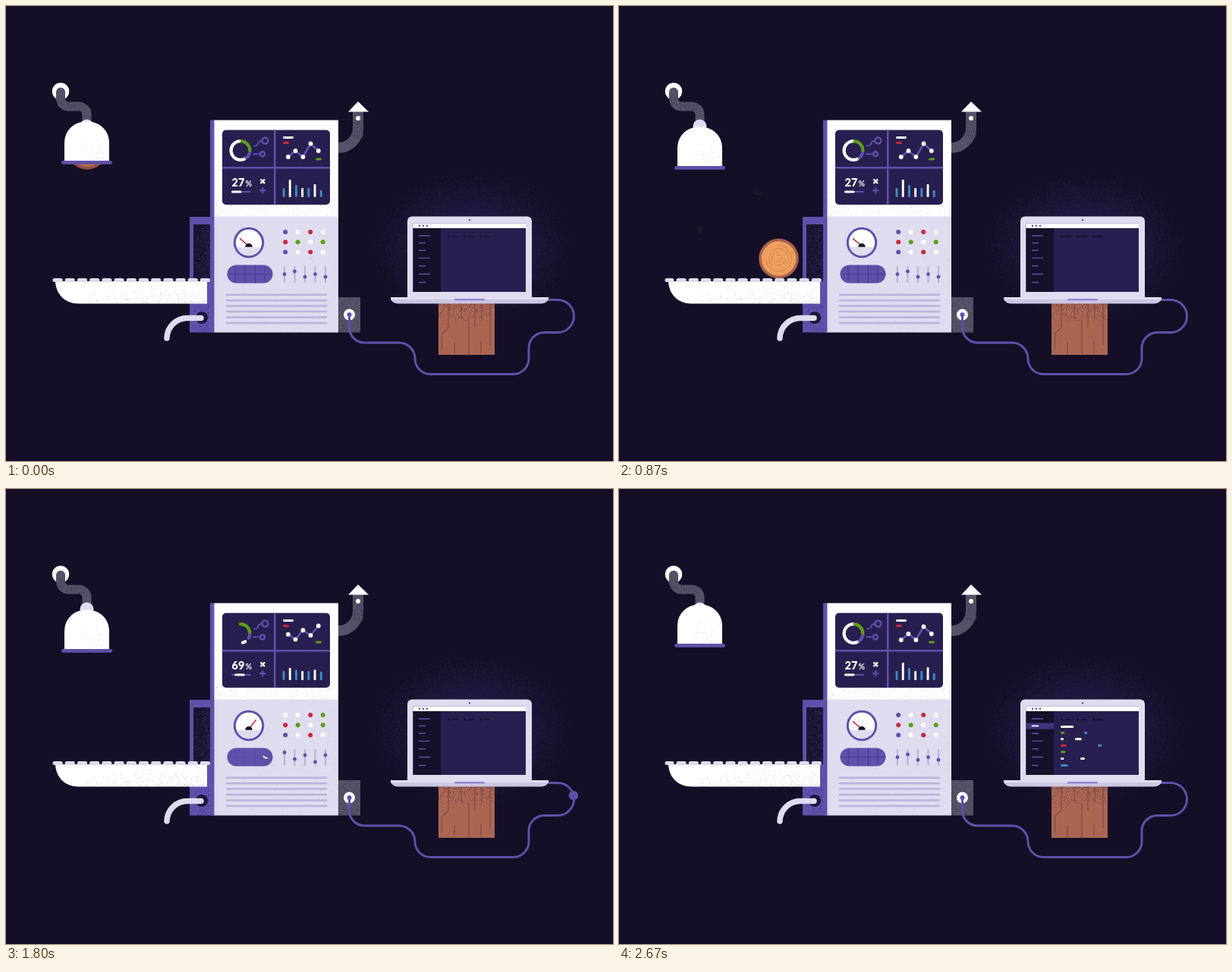
These frames come from a looping animation (800x600 px, 2700 ms). An HTML page with a canvas:

```html
<!DOCTYPE html>
<html lang="en">
<head>
<meta charset="utf-8">
<title>Data machine</title>
<style>
html, body { margin: 0; width: 100%; height: 100%; overflow: hidden; background: #140f27; }
canvas { display: block; width: 800px; height: 600px; }
</style>
</head>
<body>
<canvas id="stage" width="800" height="600"></canvas>
<script>
const LOOP = 2700;
const C = {
  bg: '#140f27', purple: '#5f50ab', lilac: '#dfdcef', shade: '#cfcae6', line: '#bab3dc',
  screen: '#281f50', dark: '#15112a', grey: '#565166', speck: '#464058', white: '#fff',
  red: '#c8293a', green: '#5c9f18', blue: '#3c8bc6',
  bark: '#a9604f', wood: '#ef9f5c', board: '#ab6652', trace: '#8a4f4a'
};
const HUE = { P: C.purple, W: C.white, R: C.red, G: C.green, B: C.blue };
const stage = document.getElementById('stage').getContext('2d');
let g = stage;

let seed = 7;
const rnd = () => (seed = (seed * 16807) % 2147483647) / 2147483647;
const clamp = v => Math.max(0, Math.min(1, v));
const mix = (a, b, k) => a + (b - a) * k;
const rad = deg => deg * Math.PI / 180;

// Smooth step from 0 to 1, and the same rise followed by a fall.
function ramp(t, a, b) {
  const u = clamp((t - a) / (b - a));
  return u * u * (3 - 2 * u);
}
const hump = (t, a, b, c, d) => ramp(t, a, b) - ramp(t, c, d);

function rect(x, y, w, h, fill, r = 0) {
  g.fillStyle = fill;
  g.beginPath();
  g.roundRect(x, y, w, h, r);
  g.fill();
}
function dot(x, y, r, fill) {
  g.fillStyle = fill;
  g.beginPath();
  g.arc(x, y, r, 0, 7);
  g.fill();
}
function shape(d, fill) {
  g.fillStyle = fill;
  g.fill(new Path2D(d));
}
function stroke(d, color, w, cap = 'round') {
  g.strokeStyle = color;
  g.lineWidth = w;
  g.lineCap = cap;
  g.lineJoin = 'round';
  g.stroke(typeof d === 'string' ? new Path2D(d) : d);
}
const line = (x1, y1, x2, y2, color, w, cap) => stroke(`M${x1} ${y1}L${x2} ${y2}`, color, w, cap);
function arc(x, y, r, from, to, color, w, cap = 'butt') {
  const p = new Path2D();
  p.arc(x, y, r, from, to);
  stroke(p, color, w, cap);
}

// Exponents above 1 crowd the specks left/top, below 1 right/bottom.
function grain(x, y, w, h, n, color, px = 1, py = 1) {
  g.fillStyle = color;
  for (let i = 0; i < n; i++) g.fillRect(Math.floor(x + w * rnd() ** px), Math.floor(y + h * rnd() ** py), 1, 1);
}

function layer(draw) {
  const c = document.createElement('canvas');
  c.width = 800;
  c.height = 600;
  g = c.getContext('2d');
  draw();
  g = stage;
  return c;
}

const glow = layer(() => {
  g.save();
  g.translate(614, 318);
  g.scale(1, .74);
  const grad = g.createRadialGradient(0, 0, 60, 0, 0, 130);
  grad.addColorStop(0, 'rgba(64,53,128,.8)');
  grad.addColorStop(1, 'rgba(64,53,128,0)');
  g.fillStyle = grad;
  g.fillRect(-140, -140, 280, 280);
  g.restore();
  g.fillStyle = 'rgba(72,60,142,.65)';
  for (let i = 0; i < 15000; i++) {
    const a = rnd() * 2 * Math.PI, r = Math.sqrt(rnd());
    if (rnd() < (1 - r) * 1.9) g.fillRect(Math.floor(614 + Math.cos(a) * r * 134), Math.floor(318 + Math.sin(a) * r * 103), 1, 1);
  }
});

const CABLE = 'M452.5 407V424A20 20 0 0 0 472.500 444H518A21 21 0 0 1 539 465A20.5 20.5 0 0 0 559.5 485.5H668.5A20.5 20.5 0 0 0 689 465V451A20.5 20.5 0 0 1 709.5 430.5H727A21.5 21.5 0 0 0 727 387.5H714';
const cable = document.createElementNS('http://www.w3.org/2000/svg', 'path');
cable.setAttribute('d', CABLE);
const cableLength = cable.getTotalLength();

const menuY = i => 303 + i * (9.3 + .16 * i);
const menuEnd = i => '1001010'[i] === '1' ? 558.5 : 552.5;
const tabX = i => 584 + 21 * i;

function tab(i, dotColor, lineColor) {
  dot(tabX(i), 304, 1.5, dotColor);
  line(tabX(i) + 4, 304, tabX(i) + 11, 304, lineColor, 1.7);
}

function laptop() {
  rect(529, 277.5, 164, 108, C.lilac, [6, 6, 0, 0]);
  rect(536.5, 286.5, 148.5, 90.5, C.screen);
  rect(536.5, 286.5, 148.5, 6.5, C.white);
  rect(536.5, 293, 36.5, 84, C.dark);
  for (let i = 0; i < 3; i++) {
    dot(545 + 5 * i, 289.7, 1.2, C.purple);
    tab(i, C.dark, C.dark);
  }
  dot(611, 282.3, 1.2, C.purple);
  shape('M507 384H715V387Q712 392.5 704 392.5H518Q510 392.5 507 387Z', '#cbc7e2');
  rect(507, 384, 208, 3, C.lilac);
  rect(591, 386, 40, 2.5, '#9188d2', 1);
  for (let i = 0; i < 7; i++) line(544.5, menuY(i), menuEnd(i), menuY(i), C.purple, 1.4);
}

const back = layer(() => {
  // Supply arm
  dot(72, 112.5, 11.2, C.white);
  stroke('M72 113.500V122A10.5 10.5 0 0 0 82.5 132.5H96A10.5 10.5 0 0 1 106.5 143V158', C.grey, 12);
  grain(67, 118, 11, 14, 40, C.speck);
  grain(80, 127, 26, 11, 80, C.speck);
  dot(106.5, 158.5, 9, C.lilac);
  // Exhaust
  stroke('M438 187A26 26 0 0 0 464 161V139', C.grey, 14, 'butt');
  grain(457, 140, 14, 34, 140, C.speck, 1, .7);
  shape('M451 139.5L464 126L478 139.5Z', C.white);
  dot(464, 148, 3, C.white);
  // Intake
  rect(242, 278, 33, 152.5, C.purple);
  rect(247, 288, 23, 75, '#1b1533');
  grain(247, 288, 22, 72, 200, '#30275f', .6, .8);
  grain(243, 393, 27, 37, 150, '#4a3e8f', .6);
  // Outlet block and circuit sheet
  rect(438, 384, 29, 46.5, C.grey);
  grain(438, 384, 29, 46, 220, C.speck, 1.8);
  rect(570, 390, 74, 70, C.board);
  stroke('M583 392V424L574.5 432V453M610 414V460M618 392V423M600 392V410M627 392V413M638 392V447M591 444V458M626 442V458', C.trace, 1.5);
  grain(570, 392, 74, 24, 380, '#7d4847', 1, 2.2);
  stroke(CABLE, C.purple, 3);
  dot(452.5, 407, 7.5, C.white);
  dot(452.5, 407, 3, C.purple);
  line(452.5, 407, 452.5, 415, C.purple, 3, 'butt');
  laptop();
});

const knobX = i => 367 + 13.5 * i;

const front = layer(() => {
  // Hose and tray
  dot(258, 411, 8, '#1d1638');
  stroke('M257 411.5H239A27 27 0 0 0 212 438', C.lilac, 7.5);
  shape('M65 363H265V392.5H96C77 392.5 66 380 65 363Z', C.white);
  grain(100, 364, 164, 28, 130, C.shade, .7, .35);
  // Body
  rect(269, 150.5, 6, 280, C.purple);
  rect(274.5, 150.5, 163.5, 127.5, C.white);
  rect(274.5, 277.5, 163.5, 153, C.lilac);
  grain(275, 151, 162, 126, 300, C.lilac, 1, .25);
  grain(275, 278, 162, 152, 200, C.shade, .5, .6);
  rect(285, 163.5, 142, 98.5, C.screen, 5);
  grain(286, 165, 140, 96, 600, '#231b48', .6, .6);
  rect(353, 163.5, 2.5, 98.5, C.purple);
  rect(285, 212, 142, 2.5, C.purple);
  // Dashboard fixtures
  arc(341.5, 177.5, 4, 0, 7, C.purple, 2.4);
  arc(338, 195.2, 3, 0, 7, C.purple, 2.4);
  stroke('M337 178C329 178 335 185 327 184.5M334 195.2H326', C.purple, 1.8);
  stroke('M335.5 228.5L341 234M341 228.5L335.5 234', C.white, 2.3, 'butt');
  stroke('M338.3 239V247.5M334 243.2H342.6', C.purple, 2, 'butt');
  line(298, 245, 322, 245, C.purple, 2);
  // Gauge, scope, vents
  dot(320, 312, 20.2, C.purple);
  dot(320, 312, 17.2, C.white);
  g.fillStyle = C.lilac;
  g.beginPath();
  g.arc(320, 312, 17.2, rad(20), rad(160));
  g.fill();
  rect(291.5, 341.5, 60, 24, C.purple, 12);
  for (let i = 0; i < 6; i++) line(291, 380.7 + i * 7.45, 422, 380.7 + i * 7.45, C.line, 2.5);
  for (let i = 0; i < 5; i++) line(knobX(i), 344, knobX(i), 364, C.line, 2.2);
});

// Launch time, start point, end point, end angle, spin.
const LEAVES = [
  [180, 97, 225, 49, 301, 28, 16],
  [250, 107, 328, 107, 295, 82, 60],
  [250, 125, 315, 182, 246, 3, 60],
  [1010, 235, 333, 178, 253, 78, 9],
  [1010, 250, 322, 180, 347, 32, 256]
];

// Flies fast, then slows and fades.
function leaf(t, [t0, x0, y0, x1, y1, angle, spin]) {
  const u = (t - t0) / 650;
  if (u < 0 || u > 1) return;
  const p = 1 - (1 - u) ** 5;
  g.save();
  g.globalAlpha = clamp(1.2 * (1 - u));
  g.translate(mix(x0, x1, p), mix(y0, y1, p));
  g.rotate(rad(angle - spin * (1 - p)));
  shape('M-7.5 0Q-1 -8 7.5 1Q0 7 -7.5 0Z', C.green);
  shape('M-7.5 0L7.5 1Q0 7 -7.5 0Z', '#3f7420');
  g.restore();
}

function log(t) {
  if (t > 1100 && t < 2680) return;
  const x = 107 + 195 * clamp((t - 300) / 790) ** 1.95;
  const q = (t > 2600 ? t - LOOP : t) / 240;
  const y = Math.min(333, 189 + 66 * q + 70 * q * Math.abs(q));
  dot(x, y, 26.3, C.bark);
  dot(x, y, 22.8, C.wood);
  const turn = (x - 107) / 26;
  for (let i = 0; i < 4; i++) arc(x, y, 4.5 + 4.2 * i, turn + 2.3 * i, turn + 2.3 * i + 4.6, '#c98456', .9);
  dot(x, y, 26.3, `rgba(130,60,55,${clamp((240 - y) / 50) * .5})`);
}

function bell(t) {
  const down = ramp(t, 0, 150) - ramp(t, 2380, 2600);
  g.save();
  g.translate(0, 7 * down - 7);
  shape('M77 212V188C77 149.5 136 149.5 136 188V212Z', C.white);
  grain(100, 178, 35, 33, 45, C.lilac, .5, .6);
  rect(73, 211, 67, 4.8, C.purple, 2.4);
  g.restore();
}

const PITCH = 16.2;
function belt(t) {
  const shift = (.9 + t / LOOP * 12 * PITCH) % PITCH;
  for (let x = 60.5 + shift - PITCH; x < 268; x += PITCH) {
    const a = Math.max(60.5, x), w = Math.min(269.5, x + 13.2) - a;
    if (w > 2) rect(a, 359, w, 5, C.lilac, Math.min(2.5, w / 2));
  }
}

function donut(t) {
  [[0, 97, C.green], [97, 150, C.purple], [150, 360, C.white]].forEach(([a, b, color], i) => {
    const left = 1 - hump(t, 1060 - 50 * i, 1300 - 70 * i, 1600 + 75 * i, 1850 + 100 * i);
    if (left > .005) arc(309, 190.5, 12.4, rad(a - 90), rad(mix(a, b, left) - 90), color, 4.2, left < 1 ? 'round' : 'butt');
  });
}

function chart(t) {
  const k = hump(t, 1020, 1390, 1700, 2250);
  const pts = [[199, 191], [191, 199], [199, 185], [181.5, 194], [191, 179.5]]
    .map(([a, b], i) => [371.8 + i * 9.6 + i * i * .1, mix(a, b, k)]);
  stroke('M' + pts.join('L'), C.purple, 2.6);
  for (const [x, y] of pts) dot(x, y, 2.9, C.white);
}

function legend(t) {
  [[366.5, 173.5, 11, C.white], [366.5, 180.5, 5, C.red], [409.5, 202, 5, C.green]].forEach(([x, y, w, color], i) => {
    g.globalAlpha = 1 - hump(t, 980 + 45 * i, 1120 + 60 * i, 1380 + 50 * i, 1640 + 50 * i);
    line(x, y, x + w, y, color, 2.8);
  });
  g.globalAlpha = 1;
}

// Bars drop away, return at an even height, then spread again.
function bars(t) {
  [12, 23, 16, 12, 12, 17, 9].forEach((tall, i) => {
    const even = mix(12, tall, .2), low = tall > 16 ? 5 : 0;
    const full = mix(tall, even, hump(t, 970, 1120, 1700, 2050));
    const h = mix(full, low, hump(t, 970, 1120, 1220 + 20 * i, 1520));
    if (h > .3) rect(364.6 + i * 8.2, 252 - h, 2.9, h, i % 2 ? C.white : C.blue, 1);
  });
}

function counter(t) {
  const k = hump(t, 980, 1180, 1640, 2000);
  g.fillStyle = C.white;
  g.font = '900 14.5px Lato, sans-serif';
  g.fillText(Math.round(mix(27, 99, k)), 297.5, 237.7);
  g.font = '700 10.5px Lato, sans-serif';
  g.fillText('%', 315.5, 237.7);
  line(298.5 + 7.5 * k, 245, 309 + 7.5 * k, 245, C.white, 3);
}

function lights(t) {
  const state = t < 1040 || t > 1950 ? 'PWRWRGWGPWRW' : t < 1330 ? 'WWRGRGWPWPRR' : 'WWRGRGWGPWRW';
  [...state].forEach((c, i) => dot(368.2 + i % 4 * 16.5, 298 + Math.floor(i / 4) * 13.2, 3, HUE[c]));
}

function gauge(t) {
  const a = rad(mix(-50, 48, hump(t, 980, 1250, 1700, 2220)));
  line(320, 316.5, 320 + Math.sin(a) * 15, 316.5 - Math.cos(a) * 15, C.red, 1.5);
  g.fillStyle = C.bg;
  g.beginPath();
  g.arc(320, 317.8, 4.8, Math.PI, 0);
  g.fill();
}

function sliders(t) {
  [353.7, 350, 357.2, 353.7, 357.2].forEach((y, i) => {
    const move = 6.2 * hump(t, 980 + 80 * i, 1120 + 80 * i, 1800 + 30 * i, 2180 + 30 * i);
    dot(knobX(i), i % 2 ? y + move : y - move, 2.4, C.purple);
  });
}

function scope(t) {
  g.globalAlpha = 1 - hump(t, 980, 1060, 1780, 1880);
  stroke('M302 344V363M315 342V365M328.5 342V365M341 344V363M292 353.5H351', '#483a8d', 1);
  g.globalAlpha = 1;
  const from = 297 + 48 * ramp(t, 1620, 1850);
  const to = 297 + 47 * clamp((t - 1000) / 160);
  if (to - from < 1) return;
  const wave = new Path2D();
  for (let x = from; x <= to; x += .75) {
    const amp = 5.2 - 3.4 * clamp((x - 305) / 35);
    wave.lineTo(x, 353 - amp * Math.sin((x - 299 - (t - 1140) * .006) / 2.35));
  }
  stroke(wave, C.white, 1.9);
}

// Rows of [offset, length, hue].
const CODE = [
  [[0, 89, 'W']],
  [[0, 15, 'G'], [31, 8, 'B']],
  [[0, 7, 'W'], [19, 36, 'W']],
  [[0, 28, 'R'], [49, 14, 'B']],
  [[0, 22, 'G']],
  [[0, 9, 'W'], [26, 18, 'W']],
  [[0, 42, 'B']]
];

function editor(t) {
  if (t < 1890) return;
  const item = Math.max(1, 4 - Math.floor((t - 2040) / 190));
  const y = menuY(item);
  rect(536.5, y - 4, 36.5, 8, t < 2300 ? '#2a2152' : '#40357c');
  line(544.5, y, menuEnd(item), y, C.white, 1.7);

  for (let i = 0; i < 3; i++) {
    g.globalAlpha = hump(t, 1920 + 90 * i, 2030 + 90 * i, 2200 + 90 * i, 2400 + 60 * i);
    tab(i, [C.blue, C.green, C.red][i], C.white);
  }
  g.globalAlpha = 1;

  // Rows type in one after another, then shrink together.
  CODE.forEach((row, i) => row.forEach(([dx, length, hue], j) => {
    const start = 1890 + 82 * i + 50 * j;
    if (t < start) return;
    const w = length * (ramp(t, start, start + 70) - .84 * ramp(t, 2480, 2670));
    const x = 583.5 + dx, rowY = 313.6 + i * (7.9 + .1 * i);
    line(x, rowY, x + Math.max(.01, w), rowY, HUE[hue], 3);
  }));
}

function packet(t) {
  const s = (t - 1115) * .587;
  if (t < 1080 || s > cableLength) return;
  const p = cable.getPointAtLength(Math.max(0, s));
  dot(p.x, p.y, 1.5 + 4.7 * ramp(t, 1080, 1160), C.purple);
}

function draw(t) {
  seed = 11;
  g.fillStyle = C.bg;
  g.fillRect(0, 0, 800, 600);
  g.globalAlpha = .3 + .6 * hump(t, 1860, 2010, 2120, 2500);
  g.drawImage(glow, 0, 0);
  g.globalAlpha = 1;
  g.drawImage(back, 0, 0);
  packet(t);
  for (const l of LEAVES) leaf(t, l);
  log(t);
  g.drawImage(front, 0, 0);
  for (const part of [belt, bell, donut, chart, legend, bars, counter, gauge, lights, sliders, scope, editor]) part(t);
}

const begin = performance.now();
function tick() {
  draw((performance.now() - begin) % LOOP);
  requestAnimationFrame(tick);
}
tick();
</script>
</body>
</html>
```
